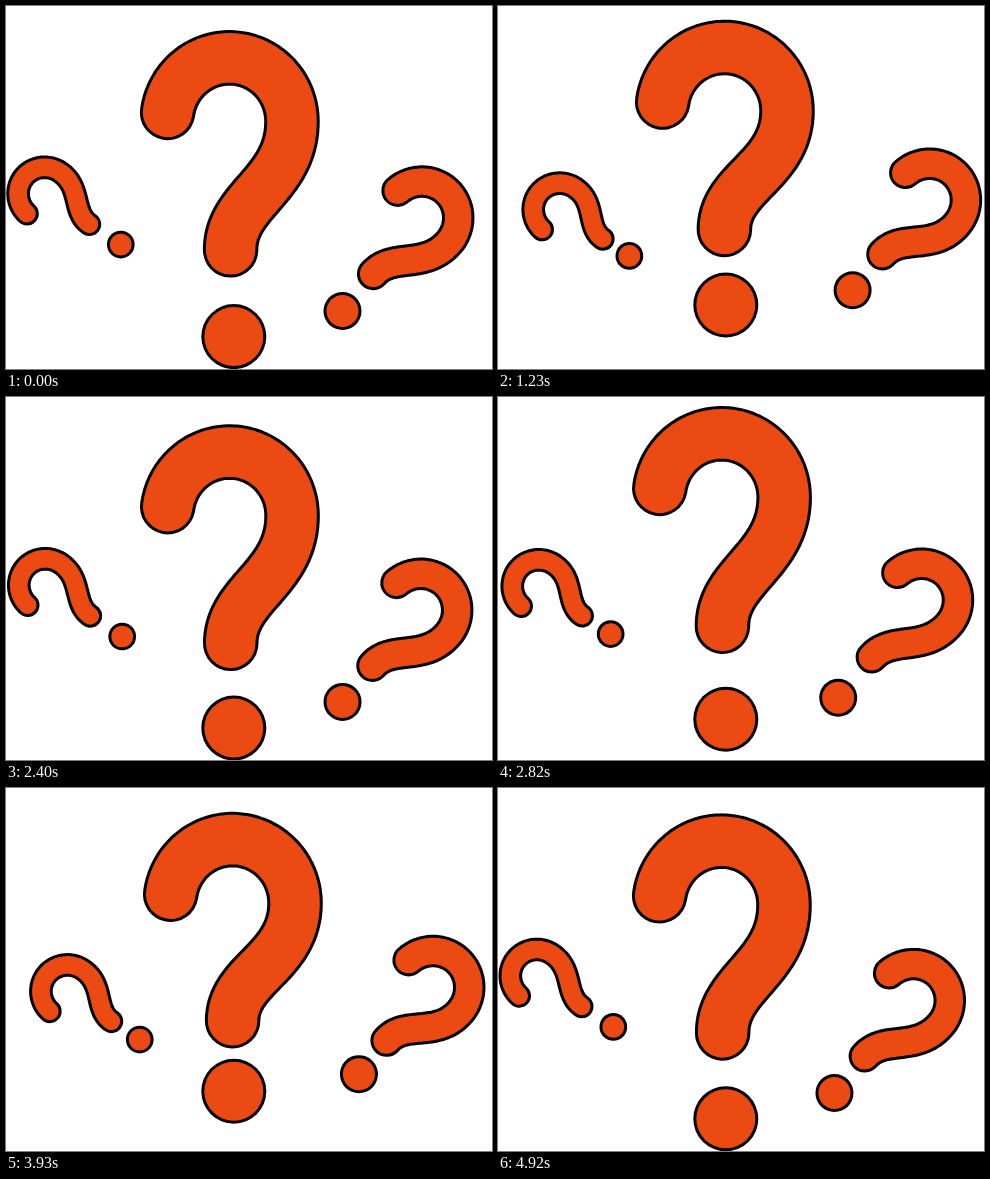
Animation of 486 by 363 pixels, one loop 4950 ms. Source, as an HTML page with a canvas:

```html
<!DOCTYPE html>
<html lang="en">
<head>
<meta charset="utf-8">
<title>Question marks</title>
<style>
  html, body { margin: 0; width: 100%; height: 100%; overflow: hidden; background: #fff; }
  canvas { display: block; }
</style>
</head>
<body>
<canvas id="stage" width="486" height="363"></canvas>
<script>
const ctx = document.getElementById('stage').getContext('2d');
const FILL = '#eb4a13', INK = '#000', LINE = 3;
const CYCLE = 2475, STEP = 30, SAMPLES = 40;
const TAU = 2 * Math.PI;

// One shape, placed three times. x, y: centre of the bend; turn: radians;
// sway: travel along the mark's own axis; drift: travel across it;
// peak: when the head is lowest on that axis, as a fraction of the cycle.
const marks = [
  { x: 225, y: 110.3, size: 1, turn: 0, sway: 18, drift: 1.6, peak: .795 },
  { x: 423.2, y: 203.6, size: .585, turn: .72, sway: 15.3, drift: 0, peak: .89 },
  { x: 50.6, y: 196, size: .426, turn: -.97, sway: 14.4, drift: 0, peak: .535 }
];

const WIDTH = 55.5, DOT_RADIUS = 32.5, DOT = [2.8, 204.5];
const RX = 62.5, RY = 63.5, CAP_ANGLE = Math.PI + .14;
const TAIL_LAG = .31, DOT_LAG = .17;

function bend(t) {
  const a = CAP_ANGLE + (TAU - CAP_ANGLE) * t;
  return [RX * Math.cos(a), RY * Math.sin(a)];
}

function tail(t) {
  const u = 1 - t;
  const cubic = (a, b, c, d) => u * u * u * a + 3 * u * u * t * b + 3 * u * t * t * c + t * t * t * d;
  return [cubic(RX, RX, .5, .5), cubic(0, 61.5, 74.5, 123.5)];
}

// lag runs from 0 at the head to 1 at the dot
function place(mark, [px, py], lag, p) {
  const phase = TAU * (p - mark.peak - DOT_LAG * mark.size * lag);
  const x = px * mark.size - mark.drift * Math.sin(phase) * (1 - lag);
  const y = py * mark.size + mark.sway * (1 - .1 * lag) * Math.cos(phase);
  const c = Math.cos(mark.turn), s = Math.sin(mark.turn);
  return [mark.x + x * c - y * s, mark.y + x * s + y * c];
}

function drawHook(mark, p) {
  ctx.beginPath();
  for (let i = 0; i <= SAMPLES; i++) {
    ctx.lineTo(...place(mark, bend(i / SAMPLES), 0, p));
  }
  for (let i = 1; i <= SAMPLES; i++) {
    const t = i / SAMPLES;
    ctx.lineTo(...place(mark, tail(t), TAIL_LAG * t, p));
  }
  const width = WIDTH * mark.size;
  for (const [color, w] of [[INK, width], [FILL, width - 2 * LINE]]) {
    ctx.strokeStyle = color;
    ctx.lineWidth = w;
    ctx.stroke();
  }
}

function drawDot(mark, p) {
  const [x, y] = place(mark, DOT, 1, p);
  const radius = DOT_RADIUS * mark.size;
  for (const [color, r] of [[INK, radius], [FILL, radius - LINE]]) {
    ctx.fillStyle = color;
    ctx.beginPath();
    ctx.arc(x, y, r, 0, TAU);
    ctx.fill();
  }
}

const start = performance.now();

function draw() {
  const elapsed = performance.now() - start;
  const p = Math.floor(elapsed / STEP) * STEP / CYCLE;
  ctx.clearRect(0, 0, 486, 363);
  ctx.lineCap = ctx.lineJoin = 'round';
  for (const mark of marks) {
    drawHook(mark, p);
    drawDot(mark, p);
  }
  requestAnimationFrame(draw);
}
draw();
</script>
</body>
</html>
```
